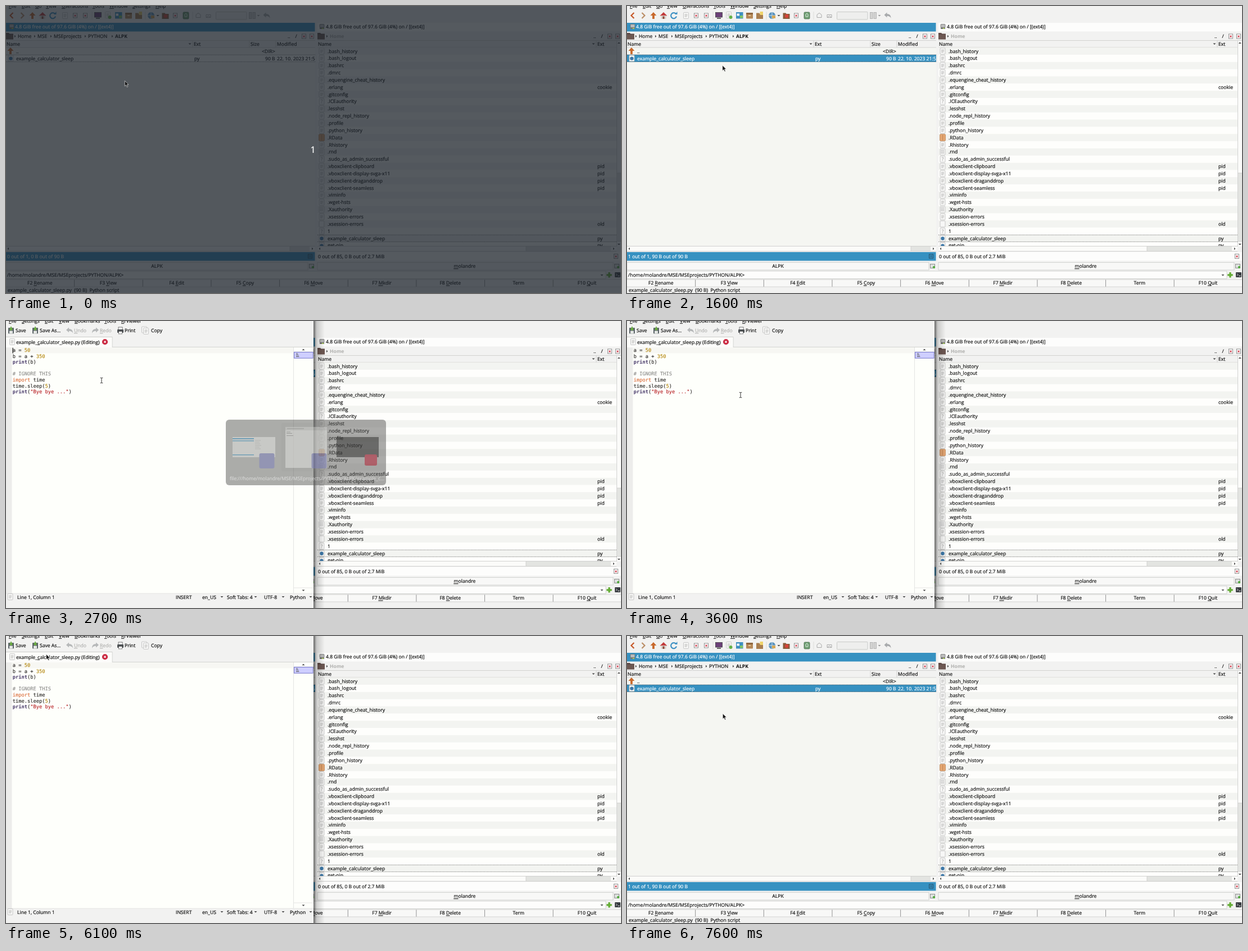
Recreate the animation shown at these times as an HTML page. Size 1094x512 px, loop 8000 ms.

```html
<!DOCTYPE html>
<html lang="en">
<head>
<meta charset="utf-8">
<title>File manager and editor</title>
<style>
html, body { margin: 0; width: 100%; height: 100%; overflow: hidden; background: #f2f2f1; }
svg { display: block; width: 1094px; height: 512px; }
text { font: 8.6px "Open Sans", "Noto Sans", sans-serif; color: #111; fill: currentColor; stroke: currentColor; stroke-width: .2px; white-space: pre; text-rendering: geometricPrecision; }
.m { font-family: "DejaVu Sans Mono", monospace; font-size: 8.72px; stroke-width: .08px; }
.b { font-weight: 700; stroke: none; }
.w { color: #fff; }
.g { color: #b0b0ae; }
.u { text-decoration: underline; }
</style>
</head>
<body>
<svg id="stage" viewBox="0 0 1094 512" xmlns="http://www.w3.org/2000/svg"></svg>
<script>
const BLUE = '#3691c1', BG = '#f2f2f1', LINE = '#c9cac8', USER = 'molandre';
const HOME = `/home/${USER}/MSE/MSEprojects/PYTHON/ALPK`;

// "&" marks the underlined letter of a label
const esc = s => s.replace(/</g, '&lt;').replace(/>/g, '&gt;')
  .replace(/&(?!lt;|gt;)(.)/g, '<tspan class="u">$1</tspan>');
const text = (x, y, s, cls = '', more = '') => `<text x="${x}" y="${y}" class="${cls}" ${more}>${esc(s)}</text>`;
const mid = (x, y, s, cls, more = '') => text(x, y, s, cls, 'text-anchor="middle" ' + more);
const rect = (x, y, w, h, fill, more = '') => `<rect x="${x}" y="${y}" width="${w}" height="${h}" fill="${fill}" ${more}/>`;
const path = (d, stroke, w = 1, more = '') => `<path d="${d}" stroke="${stroke}" stroke-width="${w}" fill="none" ${more}/>`;
const shape = (d, fill) => `<path d="${d}" fill="${fill}"/>`;
const disc = (x, y, r, fill) => `<circle cx="${x}" cy="${y}" r="${r}" fill="${fill}"/>`;
const group = (id, body) => `<g id="${id}">${body}</g>`;
const down = (x, y, c = '#444') => shape(`M${x - 2.5} ${y - 1}h5l-2.5 2.6z`, c);
const up = (x, y) => shape(`M${x - 2.5} ${y + 1}h5l-2.5-2.6z`, '#444');
const right = (x, y) => shape(`M${x - 1} ${y - 2.3}v4.6l2.4-2.3z`, '#444');
const left = (x, y) => shape(`M${x + 1} ${y - 2.3}v4.6l-2.4-2.3z`, '#444');
const edge = (c, w = .8) => `stroke="${c}" stroke-width="${w}"`;

// page icon: lines, query, bits, or blank
function page(x, y, kind = 'lines') {
  let s = rect(x - 4.5, y - 5.5, 9, 11, '#f7f7f6', edge('#bcbcbb') + ' rx="1"');
  if (kind === 'lines') s += path(`M${x - 2.5} ${y - 2}h5m-5 2h5m-5 2h4`, '#a9a9a8', .8);
  if (kind === 'query') s += mid(x, y + 3, '?', 'g');
  if (kind === 'bits') s += path(`M${x - 3} ${y - 3}h6m-6 2.5h6m-6 2.5h6`, '#999', 1.4, 'stroke-dasharray="1.2 .9"');
  return s;
}
function icon(kind, x, y) {
  if (kind === 'py') return page(x, y, '') + disc(x, y + .3, 3.2, '#3d78a8');
  if (kind === 'pack') return rect(x - 5, y - 6, 10, 12, '#e3a673', edge('#b98050', .7) + ' rx="1.5"') + path(`M${x} ${y - 5}v10`, '#c38653');
  return page(x, y, kind);
}
const arrowUp = (x, y) => shape(`M${x} ${y - 6}l5.5 6h-3.6v6h-3.8v-6h-3.6z`, '#c8692c');
const closeDoc = (x, y) => rect(x - 3.5, y - 4, 7, 8, '#fff', edge('#777'))
  + path(`M${x - 1.6} ${y - 1.4}l3.2 3.2m0-3.2l-3.2 3.2`, '#c9303f', 1.1);
const folder = x => shape(`M${x} 48h5l1.5 1.5h6.5v10h-13z`, '#5e4a46') + rect(x, 51, 13, 8.3, '#6d5852');
const drive = x => rect(x - 4, 32.5, 8, 6, '#bbb', edge('#666', .7) + ' rx="1"') + rect(x - 4, 38, 8, 3, '#777') + rect(x, 39, 3, 2, '#a7c95a');
const menu = items => items.map(([x, s]) => text(x, 3, s)).join('');

function toolbar() {
  let s = menu([[5, '&File'], [28, '&Edit'], [52, '&Go'], [71, '&View'], [99, '&Useractions'], [154, '&Tools'],
    [184, '&Window'], [225, '&Settings'], [266, '&Help']]);
  s += path('M12.5 12l-5 5l5 5', '#c65727', 2.2) + path('M26.5 12l5 5l-5 5', '#bb8f68', 2.2) + arrowUp(47, 17);
  s += shape('M58.5 17.5l6.5-6.5l6.5 6.5z', '#c33c3c') + rect(60.5, 17, 9, 6, '#d8d2cc') + rect(63.5, 18.5, 3, 4.5, '#8b4a3b');
  s += path('M87 14a5 5 0 1 0 1 4.5', '#3f91c4', 2.2) + shape('M85 15h4.5v-5z', '#3f91c4');
  s += page(105, 17) + closeDoc(123, 17) + closeDoc(141, 17);
  s += rect(157.5, 11.5, 12, 8.5, '#6b3f78', edge('#444')) + rect(160, 21, 7, 1.8, '#555');
  s += page(181, 16) + disc(184.5, 20, 3, '#63b246');
  s += rect(194, 11, 12.5, 11.5, '#3f8fc0') + rect(195.5, 13.5, 4.5, 4, '#fff') + rect(201, 17, 5, 4.5, '#83c561');
  s += rect(212, 12, 12, 10.5, '#b58858', 'rx="1"') + rect(212, 12, 12, 3, '#8e653d') + rect(216, 16, 4, 2, '#e1c496');
  s += shape('M230 12.5h5l1.5 1.5h5.5v9h-12z', '#a97e50') + rect(236.5, 10, 5.5, 6, '#efd36a');
  s += disc(258, 17, 6, '#5b93bd') + path('M252 17h12m-6-6v12', '#d8e8f2', .9) + rect(258, 17, 6, 5, '#d7a957') + down(270, 17);
  s += shape('M277.5 12.5h5l1 1.5h6v9h-12z', '#8a5b3c') + disc(284, 18, 3.2, '#d8433a') + closeDoc(301, 17);
  s += rect(315, 11, 10, 12, '#6e9e72', edge('#4c6b50') + ' rx="1.5"') + path('M318 15l2-2l2 2v4h-4z', '#e3f0e3');
  s += path('M338 15.5l4-3l4 3v5h-8zM356 20.5v-5h8v5zl4-3l4 3', '#aaa');
  s += rect(373.5, 10.5, 54.5, 13.5, '#eeeeed', `stroke="${LINE}" rx="1"`);
  s += rect(432.5, 11.5, 4.5, 11, '#d4d4d3', edge('#aaa')) + rect(439, 11.5, 4.5, 11, '#d4d4d3', edge('#aaa')) + down(449, 17, '#999');
  s += shape('M457.5 16l5-4.5v2.7c5 0 7 2.5 7 7.5c-1.5-3-3.5-4-7-4v2.8z', '#a8aaac');
  return s + path('M153 10v14M248 10v14M332 10v14', '#dcdcda');
}

const ROW = 12.846, TOP = 74.1;
const FILES = [['.bash_history'], ['.bash_logout'], ['.bashrc'], ['.dmrc'], ['.equengine_cheat_history'],
  ['.erlang', , 'cookie'], ['.gitconfig'], ['.ICEauthority', 'query'], ['.lesshst'], ['.node_repl_history'],
  ['.profile'], ['.python_history'], ['.RData', 'pack'], ['.Rhistory'], ['.rnd', 'bits'],
  ['.sudo_as_admin_successful', 'query'], ['.vboxclient-clipboard', , 'pid'], ['.vboxclient-display-svga-x11', , 'pid'],
  ['.vboxclient-draganddrop', , 'pid'], ['.vboxclient-seamless', , 'pid'], ['.viminfo'], ['.wget-hsts'],
  ['.Xauthority', 'bits'], ['.xsession-errors'], ['.xsession-errors', 'blank', 'old'], ['1', 'query'],
  ['example_calculator_sleep', 'py', 'py'], ['get-pip', 'py', 'py']];
const dotted = (x, w, y) => path(`M${x} ${y}h${w}m0 ${ROW - .6}h${-w}`, '#555', .8, 'stroke-dasharray="1.3 1.3"');

function crumbs(x, list) {
  return folder(x) + list.map(([at, s, cls]) => right(at - 5, 54) + text(at, 57, s, cls)).join('');
}
const corner = x => text(x, 57, '..') + text(x + 13.5, 57, '/') + closeDoc(x + 29, 54) + closeDoc(x + 43, 54);
function hscroll(x, end, knob) {
  return rect(x, 428.5, end - x, 9, '#e3e4e1') + rect(x, 428.5, knob - x, 9, '#fbfbf9') + rect(end - 10, 428.5, 10, 9, '#fbfbf9')
    + path(`M${x} 428.5H${end}M${x} 437.5H${end}M${knob} 429v8`, LINE, .8) + left(x + 4, 433) + right(end - 5, 433);
}
const fileCells = cls => text(18, 96.5, 'example_calculator_sleep', cls) + text(335, 96.5, 'py', cls)
  + text(461, 96.5, '90 B', cls) + text(482, 96.5, '22. 10. 2023 21:58', cls, 'clip-path="url(#half)"');

function manager() {
  let s = rect(0, 0, 1094, 512, BG) + toolbar();
  s += rect(0, 30, 549.5, 15.5, BLUE) + rect(554, 30, 540, 15.5, '#fdfdfc');
  const free = '4.8 GiB free out of 97.6 GiB (4%) on / [(ext4)]';
  s += drive(10) + text(16, 40.3, free, 'w') + drive(562) + text(569, 40.3, free);
  s += crumbs(0, [[21, 'Home'], [56, 'MSE'], [85, 'MSEprojects'], [146, 'PYTHON'], [194, 'ALPK', 'b']]) + corner(501);
  s += crumbs(554, [[576, 'Home', 'b g']]) + corner(1045);
  // left list
  s += rect(0, 61.5, 550, 367, '#f5f6f2') + rect(0, 61.5, 550, 12.5, BG) + path('M0 61.5H550M0 74H550M332 62v12M433 62v12M480 62v12', LINE, .8);
  s += text(1, 71, 'Name') + down(327, 67.5) + text(334, 71, 'Ext') + text(435, 71, 'Size') + text(482, 71, 'Modified');
  s += arrowUp(8, 80) + text(18, 83.5, '..') + text(455, 83.5, '<DIR>');
  s += rect(0, TOP + ROW, 550, ROW, '#fefefc') + dotted(0, 550, 87.2) + fileCells('');
  s += hscroll(0, 550, 505);
  // right list
  s += rect(554, 61.5, 540, 367, '#fefefc') + rect(554, 61.5, 532, 12.5, BG) + path('M554 61.5H1094M554 74H1086M1050 62v12', LINE, .8);
  s += text(555, 71, 'Name') + down(1045, 67.5) + text(1052, 71, 'Ext');
  const rows = FILES.map(([name, kind, ext], i) => {
    const y = TOP + i * ROW, c = y + ROW / 2;
    return (i % 2 ? '' : rect(554, y, 532, ROW, '#f3f4f1')) + icon(kind || 'lines', 561.5, c)
      + text(572, c + 3, name) + (ext ? text(1052, c + 3, ext) : '');
  }).join('');
  s += `<g clip-path="url(#rows)">${rows}${dotted(554, 532, 408.4)}</g>` + hscroll(554, 1086, 925);
  s += rect(1086.5, 62, 7.5, 367, '#e3e4e1') + rect(1086.5, 62, 7.5, 236, '#fbfbf9') + rect(1086.5, 420, 7.5, 9, '#fbfbf9')
    + path('M1086.5 62V429M1086.5 298h8M1086.5 420h8', LINE, .8) + up(1090.3, 66) + down(1090.3, 425);
  // status, tabs, command line
  s += rect(0, 439, 549.5, 15.5, BLUE) + rect(554, 439, 540, 15.5, '#fdfdfc') + text(555, 449.7, '0 out of 85, 0 B out of 2.7 MiB');
  s += rect(537.5, 443, 7, 7, 'none', 'stroke="#27516b"') + path('M539 445.5h4m-4 2h4', '#27516b', .8) + closeDoc(1085, 446.5);
  for (const [x, w, name] of [[0, 537, 'ALPK'], [554, 526, '&' + USER]])
    s += rect(x, 457.5, w, 13.5, '#f8f8f7', edge(LINE)) + mid(x + w / 2 - (x ? 1 : 0), 467.2, name)
      + rect(x + w + 2.5, 460.5, 8, 7, '#dfe3e0', edge('#777')) + disc(x + w + 9, 466, 2.2, '#58ad45');
  s += rect(0, 473, 1067, 13.5, '#fdfdfc', edge(LINE)) + text(2, 482.5, HOME + '>') + down(1060, 480);
  s += path('M1073 475v9.5m-4.7-4.7h9.4', '#62ac32', 3.2) + rect(1083, 475, 10, 9, '#383c40', 'rx="1"') + path('M1085 477.5l2 2l-2 2m3.5 0h3', '#fff', .9);
  ['F2 &Rename', 'F3 &View', 'F4 &Edit', 'F5 &Copy', 'F6 &Move', 'F7 &Mkdir', 'F8 &Delete', 'Term', 'F10 &Quit'].forEach((k, i) => {
    const x = i * 121.65;
    s += rect(x, 488, 121.65, 13, '#f8f8f7') + (i ? path(`M${x} 488v13`, '#888', .9) : '') + mid(x + 60.3, 497.4, k);
  });
  s += path('M0 488H1094M0 501H1094', LINE, .8) + text(3, 510, 'example_calculator_sleep.py  (90 B)  Python script');
  s += icon('py', 8.5, 93.3);
  s += group('idle', text(2, 449.7, '0 out of 1, 0 B out of 90 B', 'w'));
  s += group('picked', rect(0, TOP + ROW, 550, ROW, BLUE) + icon('py', 8.5, 93.3) + dotted(0, 550, 87.2) + fileCells('w')
    + text(2, 449.7, '1 out of 1, 90 B out of 90 B', 'w'));
  return s;
}

// code lines as [column, colour, string, bold]
const INK = '#1f1c1b', NUM = '#b08000', KEY = '#463768', STR = '#b31217';
const CODE = [
  [[0, INK, 'a = '], [4, NUM, '50']], [[0, INK, 'b = a + '], [8, NUM, '350']], [[0, KEY, 'print', 1], [5, INK, '(b)']], [],
  [[0, '#898887', '# IGNORE THIS']], [[0, '#d8612c', 'import'], [7, INK, 'time']], [[0, INK, 'time.sleep('], [11, NUM, '5'], [12, INK, ')']],
  [[0, KEY, 'print', 1], [5, INK, '('], [6, STR, '"Bye bye ..."'], [19, INK, ')']]];

function editor() {
  let s = rect(547, 0, 20, 512, 'url(#shade)') + rect(0, 0, 547, 512, BG);
  s += menu([[5, '&File'], [28, '&Settings'], [69, '&Edit'], [94, '&View'], [122, '&Bookmarks'], [175, '&Tools'], [205, '&KrViewer']]);
  const save = x => rect(x - 5, 12, 10, 10.5, '#5b6468', 'rx="1"') + rect(x - 3, 17.5, 6, 5, '#e4e6e4') + path(`M${x} 10v6m-2.5-2.5l2.5 2.5l2.5-2.5`, '#6db33f', 1.8);
  s += save(9) + text(17, 20.3, 'Save') + save(52) + text(60, 20.3, 'Save As...');
  s += shape('M107 16l5-4.5v2.7c5 0 7 2.5 7 7.5c-1.5-3-3.5-4-7-4v2.8z', '#b6b8b9') + text(121, 20.3, '&Undo', 'g');
  s += shape('M165 16l-5-4.5v2.7c-5 0-7 2.5-7 7.5c1.5-3 3.5-4 7-4v2.8z', '#b6b8b9') + text(167, 20.3, '&Redo', 'g');
  s += rect(200, 11, 7, 5, '#fff', edge('#555')) + rect(198, 15, 11, 6, '#4c5053', 'rx="1"') + rect(200.5, 18.5, 6, 4.5, '#fff', edge('#555', .7)) + text(211, 20.3, 'Print');
  s += page(246, 15.5, '') + page(249, 18) + text(258, 20.3, 'Copy');
  s += path('M0 28.5H189V47M189 46.7H547', LINE, .9) + rect(0, 29, 188.5, 18.5, '#fcfcfa');
  s += page(11, 37) + text(18, 41, 'example_&calculator_sleep.py (Editing)') + disc(176, 37.3, 5, '#c9213a') + path('M174.2 35.5l3.6 3.6m0-3.6l-3.6 3.6', '#fff', 1.2);
  s += rect(0, 47.2, 547, 438.8, '#fefffb') + rect(0, 47.2, 10.5, 438.8, '#ededeb') + rect(10.5, 47.2, 501, 10.3, '#f7f7f3');
  CODE.forEach((line, i) => line.forEach(([col, ink, str, bold]) => {
    s += text(11.7 + col * 5.25, 55.2 + i * 10.57, str, bold ? 'm b' : 'm', `style="color:${ink}"`);
  }));
  s += path('M511.5 47V486', '#dededc', .8) + path('M512 55.3h35M512 476h35', '#dededc', .8) + up(529, 51.3) + down(529, 480.5);
  s += rect(512.5, 55.5, 33.5, 10.8, '#ceceff', edge('#6c6cc4', .9)) + path('M516 58h3m-3 1.7h4m-4 2.3h5m-5 1.6h5.5', '#555', .8);
  s += path('M0 486H547', '#dededc', .8) + page(7.5, 492) + text(20, 495.6, 'Line 1, Column 1') + text(302, 495.6, 'INSERT');
  for (const [x, label, at] of [[349, 'en_US', 384], [393, 'Soft Tabs: 4', 444], [459, 'UTF-8', 493], [505, 'Python', 542]])
    s += text(x, 495.6, label) + down(at, 492);
  return s + group('caret', rect(11.5, 47.7, 1.2, 10, '#111'));
}

// window previews, drawn over the switcher panel
function previews() {
  let s = rect(403, 207, 76, 36, '#e6e7e4') + rect(403, 209, 38, 2, BLUE) + rect(403, 213, 38, 1.5, BLUE) + rect(403, 238, 38, 1.5, BLUE)
    + path('M443 213h10m-10 3h8m-8 3h9m-9 3h11m-11 3h8m-8 3h10', '#aaa', .7);
  s += rect(490, 182, 88, 86, '#8b8b89', 'rx="3" opacity=".2"') + rect(497, 189, 74, 73, '#e2e3df') + rect(497, 189, 74, 6, '#c9cac7')
    + path('M500 192h30m-31 6h7m-7 2.5h10m-10 4h12', '#777', .8);
  s += rect(588, 207, 75, 36, '#2b2b2a');
  const badge = (x, y, w, h, c) => rect(x, y, w, h, c, 'rx="3"');
  s += badge(450.5, 236, 27, 27, '#7d80bd') + badge(543.5, 236, 27, 27, '#7d80bd') + badge(638, 238, 22, 20, '#b3182c');
  return s + text(398, 283.5, `file://${HOME}/example_c…`, 'w');
}

const ARROW = '<path d="M0 0v9.4l2.2-2l1.7 3.7l1.6-.7l-1.7-3.6h2.9z" fill="#111" stroke="#fff" stroke-width=".6"/>';
const BEAM = path('M-2.3 -4.6h1.6l.7 .6l.7-.6h1.6M0-4v8M-2.3 4.6h1.6l.7-.6l.7 .6h1.6', '#333');

document.getElementById('stage').innerHTML = `<defs>
<clipPath id="half"><rect width="549.5" height="512"/></clipPath>
<clipPath id="rows"><rect x="554" y="74.3" width="532" height="354"/></clipPath>
<linearGradient id="shade"><stop offset="0" stop-opacity=".58"/><stop offset=".28" stop-opacity=".17"/><stop offset="1" stop-opacity="0"/></linearGradient>
</defs>` + manager()
  + group('dim', rect(0, 0, 1094, 512, '#1c232b', 'opacity=".75"') + mid(546, 262.3, '1', 'w', 'style="font-size:16px"'))
  + group('editor', editor()) + group('panel', rect(391, 176, 285, 117, '#5a5a58', 'rx="6"')) + group('previews', previews())
  + group('arrow', ARROW) + group('beam', BEAM);

// opacity steps: [time, value]
const SWITCH = [[0, 0], [2500, .92], [2700, .5], [2900, 0]];
const STEPS = {
  dim: [[0, 1], [500, 0]],
  idle: [[0, 1], [1300, 0]],
  picked: [[0, 0], [1300, 1]],
  panel: SWITCH,
  previews: SWITCH,
  editor: [[0, 0], [2700, 1], [7000, .75], [7100, .5], [7200, .22], [7300, 0]],
  caret: [[0, 1], [3200, 0], [3900, 1], [4500, 0], [5100, 1], [5700, 0], [6300, 1], [6900, 0]]
};
// pointer steps: [time, shape, x, y]
const POINTER = [
  [0, 'arrow', 211.3, 133.5], [700, 'arrow', 205, 129], [800, 'arrow', 187, 117], [900, 'arrow', 164, 104], [1000, 'arrow', 147, 95],
  [1100, 'arrow', 139.5, 92], [1500, 'arrow', 154, 98], [1600, 'arrow', 169.8, 106],
  [2700, 'beam', 170, 106], [2900, 'beam', 170.5, 106.5], [3100, 'beam', 177, 111], [3200, 'beam', 182.5, 116], [3400, 'beam', 202, 132],
  [5300, 'beam', 198.3, 128], [5400, 'beam', 176, 108], [5500, 'beam', 136, 76], [5600, 'beam', 102, 50], [5700, 'arrow', 82, 31.5],
  [6100, 'arrow', 71.5, 32.5], [6300, 'beam', 104, 57], [6400, 'beam', 143.3, 82], [6600, '', 0, 0],
  [7300, 'arrow', 170.5, 105.5], [7500, 'arrow', 170.5, 124], [7600, 'arrow', 170.3, 138.5]];

const el = id => document.getElementById(id);
const current = (steps, t) => steps.filter(s => s[0] <= t).pop();
const start = performance.now();
function draw() {
  const t = (performance.now() - start) % 8000;
  for (const id in STEPS) el(id).setAttribute('opacity', current(STEPS[id], t)[1]);
  const [, kind, x, y] = current(POINTER, t);
  for (const id of ['arrow', 'beam']) {
    el(id).setAttribute('opacity', id === kind ? 1 : 0);
    el(id).setAttribute('transform', `translate(${x} ${y})`);
  }
  requestAnimationFrame(draw);
}
draw();
</script>
</body>
</html>
```
